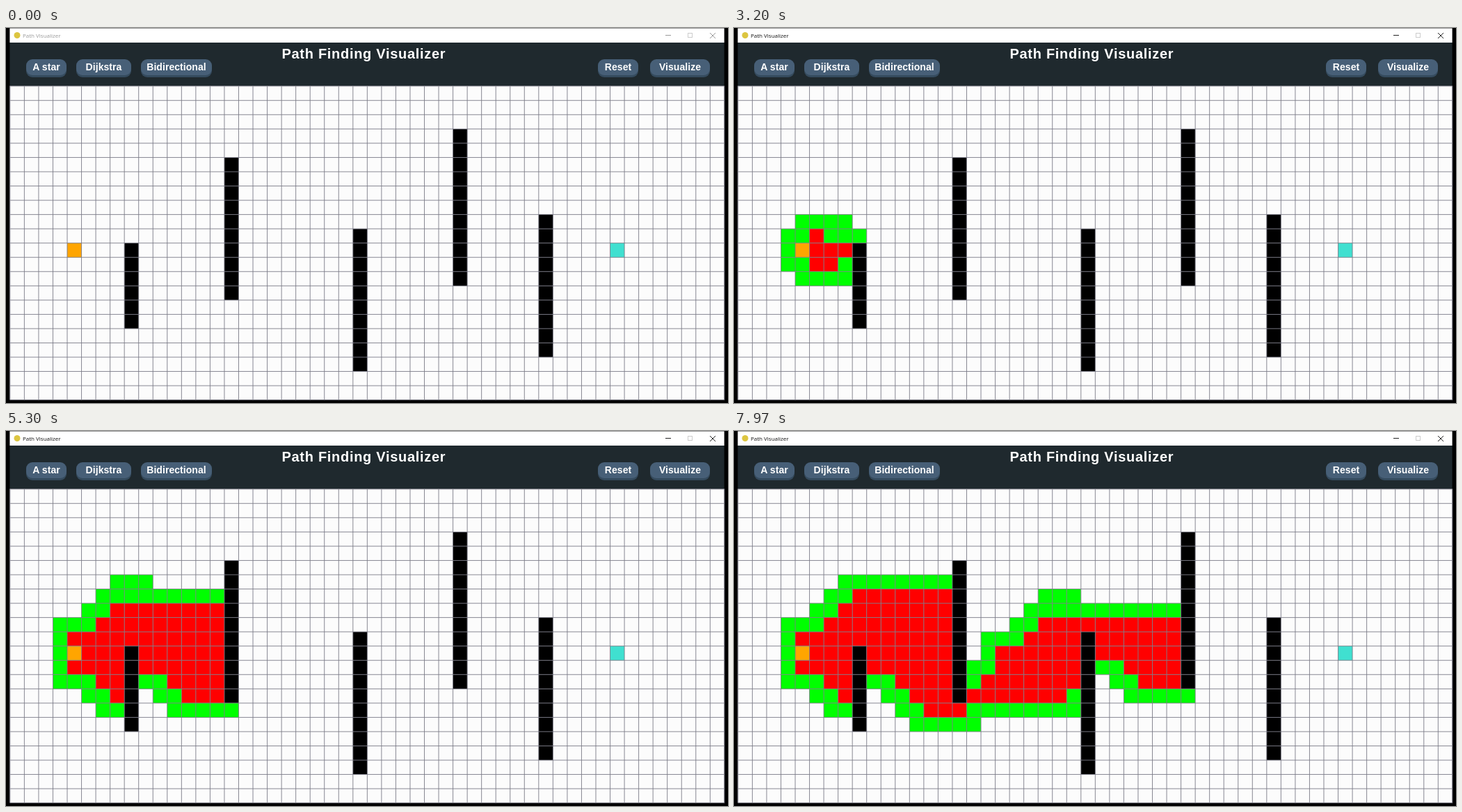
An HTML page that plays this animation: 1038 px wide and 540 px high, repeating every 8000 ms.

```html
<!DOCTYPE html>
<html lang="en">
<head>
<meta charset="utf-8">
<title>Path Visualizer</title>
<style>
  html, body { margin: 0; width: 100%; height: 100%; overflow: hidden; background: #000; }
  svg { display: block; }
  .bold { font: bold 14px "Liberation Sans", Arial, sans-serif; fill: #fff; text-anchor: middle; letter-spacing: .05px; }
  .title { font-size: 20px; letter-spacing: .7px; }
  .caption { font: 8px "Open Sans", "Noto Sans", sans-serif; }
</style>
</head>
<body>
<svg id="stage" width="1038" height="540" viewBox="0 0 1038 540"></svg>
<script>
const LOOP = 8000;
const COLS = 50, ROWS = 22, PITCH = 20.54;
const LEFT = 5.85, TOP = 83.75;
const START = [4, 11], GOAL = [42, 11];
const WALLS = [[8, 11, 16], [15, 5, 14], [24, 10, 19], [31, 3, 13], [37, 9, 18]]; // col, first row, last row
const BUTTONS = [['A star', 29, 58], ['Dijkstra', 101, 79], ['Bidirectional', 194, 102], ['Reset', 851, 58], ['Visualize', 926, 86]];
const PRESSES = [[1740, 1820], [2810, 2900]];
const FOCUS = 700;

// time, expanded nodes
const PACE = [[2906, 1], [3200, 8.4], [4570, 42.4], [5900, 74.4], [7000, 102.4], [7970, 128.4], [8000, 128.9]];
// time, x, y, downward bow of the leg leading here
const POINTER = [[740, 232, 545, 0], [870, 242, 512, 0], [1200, 242, 512, 0], [1700, 58, 60, 0],
  [1880, 58, 60, 0], [2600, 968, 79, 56], [2730, 970, 61, 0], [2910, 970, 61, 0]];

const stage = document.getElementById('stage');
const gx = c => LEFT + PITCH * c;
const gy = r => TOP + PITCH * r;

function add(tag, attrs, parent = stage, text) {
  const el = document.createElementNS('http://www.w3.org/2000/svg', tag);
  for (const k in attrs) el.setAttribute(k, attrs[k]);
  if (text) el.textContent = text;
  return parent.appendChild(el);
}
const rect = (x, y, width, height, fill, rx = 0, parent = stage) => add('rect', { x, y, width, height, fill, rx }, parent);

// Window frame
rect(5.4, .4, 1027.2, 20.6, '#fff');
rect(5.4, 21, 1027.2, 62.4, '#1f292e');
rect(5.4, 83.4, 1027.2, 451.8, '#fcfcfc');
add('circle', { cx: 16, cy: 10.5, r: 4.5, fill: '#dcc540' });
const caption = add('text', { x: 24, y: 14, class: 'caption' }, stage, 'Path Visualizer');
const controls = add('path', { d: 'M948 10.5h8M1012 7l8 8M1020 7l-8 8', fill: 'none' });
add('rect', { x: 980.5, y: 7.5, width: 6, height: 6, fill: 'none', stroke: '#ccc' });
add('text', { x: 514.4, y: 44.4, class: 'bold title' }, stage, 'Path Finding Visualizer');

const buttons = BUTTONS.map(([label, x, w]) => {
  rect(x, 48, w, 23, '#354b5e', 9);
  const face = add('g', {});
  const top = rect(x, 45, w, 23, '#475f77', 9, face);
  add('text', { x: x + w / 2, y: 61.4, class: 'bold' }, face, label);
  return { x, w, face, top };
});

// Grid
const isWall = (c, r) => WALLS.some(([wc, a, b]) => c === wc && r >= a && r <= b);
const cells = [];
for (let r = 0; r < ROWS; r++) {
  for (let c = 0; c < COLS; c++) {
    const el = rect(gx(c), gy(r), PITCH, PITCH, isWall(c, r) ? '#000' : 'none');
    cells.push({ c, r, el, wall: isWall(c, r), g: Infinity, openAt: Infinity, closeAt: Infinity });
  }
}
const cellAt = (c, r) => c >= 0 && r >= 0 && c < COLS && r < ROWS ? cells[r * COLS + c] : null;
const start = cellAt(...START), goal = cellAt(...GOAL);
start.el.setAttribute('fill', '#ffa500');
goal.el.setAttribute('fill', '#40e0d0');

let lines = '';
for (let c = 0; c <= COLS; c++) lines += `M${gx(c)} ${gy(0)}V${gy(ROWS)}`;
for (let r = 0; r <= ROWS; r++) lines += `M${gx(0)} ${gy(r)}H${gx(COLS)}`;
add('path', { d: lines, stroke: '#7c7c88', opacity: .9, fill: 'none' });

const pointer = add('path', { d: 'M0 0V11.5L2.7 9.1L4.6 13.3L6.4 12.5L4.6 8.4H8Z', fill: '#fff', stroke: '#000', 'stroke-width': .9 });

// A* over eight directions, every step costs 1, octile heuristic in thousandths; ties go to the older entry
function search(limit) {
  const dirs = [[0, 1], [0, -1], [1, 0], [-1, 0], [1, 1], [1, -1], [-1, 1], [-1, -1]];
  const score = n => {
    const dx = Math.abs(n.c - goal.c), dy = Math.abs(n.r - goal.r);
    return 1000 * (n.g + Math.max(dx, dy)) + 414 * Math.min(dx, dy);
  };
  start.g = 0;
  const queue = [{ node: start, f: 0 }];
  for (let step = 1; step <= limit && queue.length; step++) {
    let best = 0;
    queue.forEach((q, i) => { if (q.f < queue[best].f) best = i; });
    const { node } = queue.splice(best, 1)[0];
    node.closeAt = step + 1;
    for (const [dx, dy] of dirs) {
      const next = cellAt(node.c + dx, node.r + dy);
      if (!next || next.wall || next.g <= node.g + 1) continue;
      next.g = node.g + 1;
      if (next.openAt < Infinity) continue;
      next.openAt = step;
      queue.push({ node: next, f: score(next) });
    }
  }
}
search(132);
const visited = cells.filter(n => n.openAt < Infinity && n !== start && n !== goal);

function leg(table, t) {
  const i = table.findIndex(p => p[0] > t);
  if (i < 1) return null;
  const a = table[i - 1], b = table[i];
  return { a, b, k: (t - a[0]) / (b[0] - a[0]) };
}

function pointerAt(t) {
  const m = leg(POINTER, t);
  if (!m) return null;
  const e = m.k * m.k * (3 - 2 * m.k);
  return {
    x: m.a[1] + (m.b[1] - m.a[1]) * e,
    y: m.a[2] + (m.b[2] - m.a[2]) * e + m.b[3] * Math.sin(Math.PI * e)
  };
}

function render(t) {
  const active = t >= FOCUS;
  caption.setAttribute('fill', active ? '#111' : '#999');
  controls.setAttribute('stroke', active ? '#222' : '#999');

  const p = pointerAt(t);
  pointer.setAttribute('visibility', p ? 'visible' : 'hidden');
  if (p) pointer.setAttribute('transform', `translate(${p.x.toFixed(1)} ${p.y.toFixed(1)})`);

  const down = PRESSES.some(([a, b]) => t >= a && t < b);
  for (const { x, w, face, top } of buttons) {
    const over = p && p.x >= x && p.x <= x + w && p.y >= 45 && p.y <= 69;
    top.setAttribute('fill', over ? '#d74b4b' : '#475f77');
    face.setAttribute('transform', `translate(0 ${over && down ? 3 : 0})`);
  }

  const m = leg(PACE, t);
  const n = m ? Math.floor(m.a[1] + (m.b[1] - m.a[1]) * m.k) : 0;
  for (const v of visited) {
    const fill = v.closeAt <= n ? '#f00' : v.openAt <= n ? '#0f0' : 'none';
    if (v.fill !== fill) v.el.setAttribute('fill', v.fill = fill);
  }
}

const t0 = performance.now();
function tick() {
  render((performance.now() - t0) % LOOP);
  requestAnimationFrame(tick);
}
tick();
</script>
</body>
</html>
```
